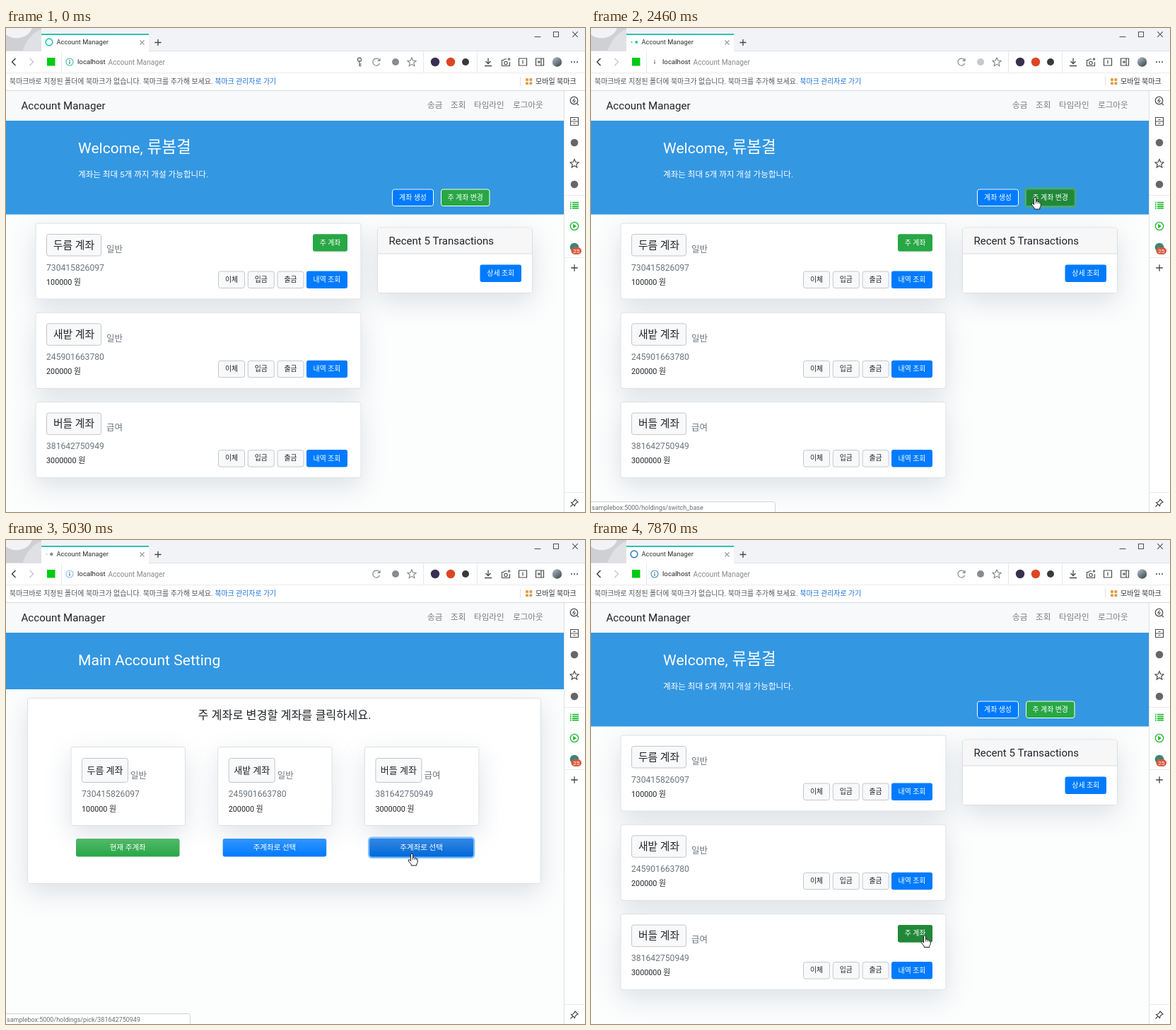
Recreate the animation shown at these times as an HTML page with a canvas. Size 819x684 px, loop 8 s.

```html
<!DOCTYPE html>
<html lang="ko">
<head>
<meta charset="utf-8">
<title>Account Manager</title>
<style>
html, body { margin: 0; width: 100%; height: 100%; overflow: hidden; background: #fcfdfd; }
canvas { display: block; }
</style>
</head>
<body>
<canvas id="stage" width="819" height="684"></canvas>
<script>
const ctx = document.getElementById('stage').getContext('2d');
const LOOP = 8000;
const FONT = 'Roboto, "Noto Sans CJK KR", "Noto Sans KR", sans-serif';
const BLUE = '#007bff', GREEN = '#28a745', GRAY = '#6c757d', INK = '#212529', ICON = '#4a4a4e';
const DARK = { [BLUE]: '#0069d9', [GREEN]: '#218838' };
const SHADOW = 'rgba(125,140,160,.25)';

const accounts = [
  { name: '두름 계좌', kind: '일반', no: '730415826097', sum: '100000 원' },
  { name: '새밭 계좌', kind: '일반', no: '245901663780', sum: '200000 원' },
  { name: '버들 계좌', kind: '급여', no: '381642750949', sum: '3000000 원' }
];

// Bursts of movement: start, end, number of steps
const bursts = [
  [670, 1450, 11], [1530, 1530, 1], [2070, 2770, 10], [3380, 4170, 11], [4630, 5030, 6],
  [5180, 5550, 6], [6560, 7330, 11], [7410, 7410, 1], [7640, 7870, 4]
];

// Pointer track: time, x, y, hand shape
const track = [
  [670, 718, 671, 0], [800, 690, 560, 0], [980, 622, 350, 0], [1130, 590, 244, 1],
  [1290, 614, 241, 1], [1450, 628, 239, 1], [3370, 628, 239, 1], [3380, 617, 248, 0],
  [3540, 604, 300, 0], [3850, 577, 428, 1], [4010, 574, 443, 1], [6500, 574, 443, 1],
  [6560, 566, 453, 0], [6710, 505, 515, 0], [6860, 437, 556, 1], [6940, 428, 567, 0],
  [7020, 438, 567, 1], [7170, 466, 556, 1], [7250, 481, 543, 0], [7330, 485, 541, 0],
  [7410, 484, 540.5, 0], [7630, 484, 540.5, 0], [7640, 482, 545, 1], [7790, 475, 555, 1],
  [7870, 472, 558.5, 1]
];

const HAND = new Path2D('M-1.4 1Q0-.6 1.4 1V6Q3.5 5 4 6.6Q6 5.8 6.3 7.3Q8.2 7 8.2 9V12Q8 14 6.8 15V17H-.8V15.5Q-3.5 12.5-4.8 10Q-5 8.2-3.2 8.8L-1.4 10.6Z');
const HAND_LINES = new Path2D('M1.4 6V9M4 6.8V9.2M6.3 7.4V9.4');
const ARROW = new Path2D('M.5.5V12.8L3.3 10.2 5.2 14.4 7 13.6 5.2 9.5H9.2Z');
const STAR = 'M0-6L1.8-2 6-1.6 2.8 1.3 3.8 5.6 0 3.3-3.8 5.6-2.8 1.3-6-1.6-1.8-2Z';

const fade = (t, a, b) => Math.max(0, Math.min(1, (t - a) / (b - a)));

function snap(t) {
  let out = 0;
  for (const [a, b, n] of bursts) {
    if (t < a) break;
    const step = n > 1 ? (b - a) / (n - 1) : 0;
    const k = step ? Math.min(n - 1, Math.floor((t - a + 10) / step)) : 0;
    out = a + k * step;
  }
  return out;
}

function rect(x, y, w, h, fill) {
  ctx.fillStyle = fill;
  ctx.fillRect(x, y, w, h);
}

function box(x, y, w, h, r, fill, stroke, width = 1) {
  ctx.beginPath();
  ctx.roundRect(x, y, w, h, r);
  if (fill) { ctx.fillStyle = fill; ctx.fill(); }
  if (stroke) { ctx.strokeStyle = stroke; ctx.lineWidth = width; ctx.stroke(); }
}

function dot(x, y, r, fill) {
  ctx.beginPath();
  ctx.arc(x, y, r, 0, 7);
  ctx.fillStyle = fill;
  ctx.fill();
}

function ring(x, y, r, color, width = 1.1) {
  ctx.beginPath();
  ctx.arc(x, y, r, 0, 7);
  ctx.strokeStyle = color;
  ctx.lineWidth = width;
  ctx.stroke();
}

function icon(x, y, d, color = ICON, width = 1.1) {
  ctx.save();
  ctx.translate(x, y);
  ctx.strokeStyle = color;
  ctx.lineWidth = width;
  ctx.stroke(new Path2D(d));
  ctx.restore();
}

// y is the optical middle of the line
function text(s, x, y, size, color = INK, align = 'left') {
  ctx.font = `${size}px ${FONT}`;
  ctx.textAlign = align;
  ctx.fillStyle = color;
  ctx.fillText(s, x, y + size * .36);
}

function card(x, y, w, h) {
  ctx.save();
  ctx.shadowColor = SHADOW;
  ctx.shadowBlur = 36;
  ctx.shadowOffsetY = 12;
  box(x, y, w, h, 3, '#fff');
  ctx.restore();
  box(x + .5, y + .5, w - 1, h - 1, 3, '#fff', '#dcdee0');
}

function button(x, y, w, h, label, color, opt = {}) {
  const { hover = 0, focus = 0, border, size = 9.9, glossy } = opt;
  if (focus) {
    ctx.globalAlpha = focus;
    box(x - 1.2, y - 1.2, w + 2.4, h + 2.4, 4, null, color === BLUE ? '#80bdff' : 'rgba(72,180,97,.6)', 2.4);
    ctx.globalAlpha = 1;
  }
  box(x, y, w, h, 3, color);
  if (hover) {
    ctx.globalAlpha = hover;
    box(x, y, w, h, 3, DARK[color]);
    ctx.globalAlpha = 1;
  }
  if (glossy) {
    const g = ctx.createLinearGradient(0, y, 0, y + h);
    g.addColorStop(0, 'rgba(255,255,255,.2)');
    g.addColorStop(1, 'rgba(255,255,255,0)');
    box(x, y, w, h, 3, g);
  }
  if (border) {
    ctx.globalAlpha = 1 - hover * .75;
    box(x + .5, y + .5, w - 1, h - 1, 3, null, border);
    ctx.globalAlpha = 1;
  }
  text(label, x + w / 2, y + h / 2 - .3, size, '#fff', 'center');
}

function plainButton(x, y, w, h, label, size) {
  box(x + .5, y + .5, w - 1, h - 1, 3, '#f8f9fa', '#c3c6c9');
  text(label, x + w / 2, y + h / 2 - .5, size, INK, 'center');
}

function navbar() {
  rect(0, 89, 789, 595, '#fcfdfd');
  rect(0, 89, 789, 42, '#f8f9fa');
  text('Account Manager', 21.5, 110, 15.1);
  [['송금', 596], ['조회', 629], ['타임라인', 662], ['로그아웃', 717]]
    .forEach(([s, x]) => text(s, x, 109, 11.6, '#7b7c7d'));
}

function homePage(t, main) {
  navbar();
  rect(0, 131, 789, 132.5, '#3397e2');
  text('Welcome,', 102, 169, 21.1, '#fff');
  text('류봄결', 199.5, 168, 22.6, '#fff');
  text('계좌는 최대 5개 까지 개설 가능합니다.', 102, 207, 11.6, '#fff');

  accounts.forEach((a, i) => {
    const y = 275.5 + i * 126.3;
    card(41.5, y, 461, 108);
    plainButton(57, y + 15.5, 78, 31.5, a.name, 14.8);
    text(a.kind, 142, y + 36.5, 12.5, GRAY);
    text(a.no, 57, y + 63, 12.15, GRAY);
    text(a.sum, 57, y + 83.5, 10.8);
    ['이체', '입금', '출금'].forEach((s, k) => plainButton(300 + k * 41.8, y + 68, 38, 24.5, s, 9.9));
    button(425, y + 68, 58, 24.5, '내역 조회', BLUE);
    if (i === main) {
      const crossing = fade(t, 6850, 7000) - fade(t, 7240, 7390);
      const hover = i === 2 ? crossing + fade(t, 7640, 7790) : 0;
      button(434, y + 15.8, 49, 24.5, '주 계좌', GREEN, { hover });
    }
  });

  card(525, 281.5, 220, 93.5);
  rect(526, 282.5, 218, 36.5, '#f7f7f7');
  rect(526, 318.5, 218, 1, '#dcdee0');
  text('Recent 5 Transactions', 541.5, 301, 15);
  button(670.5, 334.5, 58.5, 24.5, '상세 조회', BLUE);

  const first = main === 0;
  button(546, 227.5, 59, 24.5, '계좌 생성', BLUE, {
    border: '#fff',
    hover: first ? fade(t, 1140, 1290) - fade(t, 1300, 1450) : 0
  });
  button(615, 227.5, 69.5, 24.5, '주 계좌 변경', GREEN, {
    border: '#fff',
    hover: first ? fade(t, 1290, 1440) : 0,
    focus: first ? fade(t, 2060, 2210) : 0
  });
}

function settingPage(t) {
  navbar();
  rect(0, 131, 789, 80, '#3397e2');
  text('Main Account Setting', 102, 169, 21.1, '#fff');
  card(30, 223, 727, 263);
  text('주 계좌로 변경할 계좌를 클릭하세요.', 394, 247, 16.3, INK, 'center');
  accounts.forEach((a, i) => {
    const x = 91.5 + i * 207.7;
    card(x, 292, 162.5, 112);
    plainButton(x + 15.5, 308, 66, 35, a.name, 13);
    text(a.kind, x + 84.5, 332.5, 12.5, GRAY);
    text(a.no, x + 15.5, 359, 12.15, GRAY);
    text(a.sum, x + 15.5, 380, 10.8);
    const on = i === 2;
    button(x + 7.5, 422, 146.5, 25.5, i ? '주계좌로 선택' : '현재 주계좌', i ? BLUE : GREEN, {
      size: 10.5,
      glossy: true,
      hover: on ? fade(t, 3840, 3990) : 0,
      focus: on ? fade(t, 4620, 4770) : 0
    });
  });
}

function tabMark(t) {
  const waiting = t >= 4780 && t < 5170 || t >= 2140 && t < 2220;
  const loading = t >= 2220 && t < 2600 || t >= 5170 && t < 5400;
  if (waiting || loading) {
    const color = waiting ? '#8b8f92' : '#25c3a6';
    const swing = waiting ? .8 * Math.sin((t - 4950) / 55) : .5 * Math.sin((t - 2381) / 50);
    dot(57.5, 20, 1.5 - swing, color);
    dot(64.3, 20, 1.5 + swing, color);
  } else {
    ring(61, 20, 4.8, t < 5400 ? '#25c4ad' : '#2f86c6', 1.7);
  }
}

function themeArt() {
  ctx.save();
  ctx.beginPath();
  ctx.rect(0, 0, 50, 33);
  ctx.clip();
  rect(0, 0, 50, 33, '#cfd0d3');
  ctx.fillStyle = '#e0e1e4';
  ctx.beginPath();
  ctx.ellipse(42, 26, 14, 28, .6, 0, 7);
  ctx.fill();
  ctx.fillStyle = '#f3f3f6';
  ctx.beginPath();
  ctx.ellipse(17, 0, 20, 14, -.2, 0, 7);
  ctx.fill();
  ctx.restore();
}

function browserTop(t) {
  rect(0, 0, 819, 33, '#f2f3f6');
  themeArt();
  rect(50, 9, 152, 24, '#fff');
  rect(50, 8, 152, 2, '#2cc5ab');
  tabMark(t);
  text('Account Manager', 71.5, 20, 9.3, '#333');
  icon(192.5, 20.5, 'M-3-3L3 3M3-3L-3 3', '#999');
  icon(215, 20.5, 'M-4.5 0H4.5M0-4.5V4.5', '#444', 1.3);
  icon(752, 12, 'M-4.5.5H4.5', '#555');
  icon(778, 9, 'M-3.5-3.5H3.5V3.5H-3.5Z', '#555');
  icon(805, 9, 'M-3.8-3.8L3.8 3.8M3.8-3.8L-3.8 3.8', '#555');

  rect(0, 33, 819, 56, '#fff');
  rect(0, 32, 50, 1, '#dfe0e3');
  rect(202, 32, 617, 1, '#dfe0e3');
  rect(0, 63, 819, 1, '#e9eaec');
  rect(0, 88, 819, 1, '#d9dadc');
  [78, 590, 666].forEach(x => rect(x, 33, 1, 30, '#e6e7e9'));
  icon(11, 48, 'M2.5-5L-2.5 0 2.5 5', '#333', 1.3);
  icon(36, 48, 'M-2.5-5L2.5 0-2.5 5', '#c4c4c6', 1.3);
  rect(58, 42, 11.5, 11.5, '#05c916');
  ring(90, 48, 5);
  icon(90, 48, 'M0-2.7V-1.4M0-.4V2.8', '#555', 1.2);
  text('localhost', 101, 48, 9.7, '#222');
  text('Account Manager', 144.5, 48, 10.2, '#888');

  if (t < 2220) {
    ring(500, 44.5, 2.6, '#777', 1.5);
    icon(500, 48, 'M0-1V6M0 3H2.5M0 5.5H2.5', '#777', 1.4);
  }
  icon(524, 48, 'M4.6 2A5 5 0 1 1 4.4-2.3M5-5V-1.7H1.6', '#888', 1.2);
  dot(551, 48, 5, t >= 2290 && t < 2600 ? '#c9c9cc' : '#8b8b8f');
  icon(574, 48, STAR, '#808084');
  dot(607, 48, 6.2, '#372f50');
  dot(629, 48, 6.2, '#dc4522');
  dot(650, 48, 5, '#3a3838');
  icon(682, 48, 'M0-5.5V2.5M-3.5-1L0 2.5 3.5-1M-5 5.5H5', ICON, 1.3);
  icon(707, 48, 'M1-4H-2L-3-2.5H-5.5V5.5H5.5V0M2.5-4H6.5M4.5-6V-2');
  ring(707, 49.5, 2.2, ICON);
  icon(731, 48, 'M-5.5-5H5.5V5H-5.5ZM0-2.5V2.5', ICON, 1.2);
  icon(755, 48, 'M-5.5-5H5.5V5H-5.5ZM2-5V5M-3.5 0H1M-1-2V2', ICON, 1.2);
  const g = ctx.createLinearGradient(774, 42, 784, 55);
  g.addColorStop(0, '#a9b7c0');
  g.addColorStop(1, '#3c4a4e');
  dot(779.5, 48, 6.7, g);
  [800, 804, 808].forEach(x => dot(x, 48, 1, '#444'));

  text('북마크바로 지정된 폴더에 북마크가 없습니다. 북마크를 추가해 보세요.', 5, 75, 9.95, '#555');
  text('북마크 관리자로 가기', 295.5, 75, 9.9, '#1a73d9');
  rect(727, 69, 1, 13, '#e2e3e5');
  for (let i = 0; i < 4; i++) box(735 + i % 2 * 5.3, 71 + (i >> 1) * 5.3, 4, 4, 1, '#e0a04c');
  text('모바일 북마크', 749, 75, 10, '#333');
}

function sidebar() {
  rect(789, 89, 30, 595, '#fff');
  rect(789, 89, 1, 595, '#dedfe1');
  [236, 324, 656].forEach(y => rect(790, y, 29, 1, '#ececee'));
  ring(803.5, 102.5, 5.3, ICON, 1.2);
  icon(804, 103, 'M3.5 3.5L6 6M.5-3.5L-2 0H1L-1 3', ICON, 1.1);
  icon(804, 132, 'M-5.5-5.5H5.5V5.5H-5.5ZM-5.5 0H5.5M-1.5-2.5H1.5M-1.5 2.8H1.5');
  dot(804, 162, 5.3, '#66666a');
  icon(804, 191.5, STAR, ICON, 1.2);
  dot(804, 221, 5.3, '#66666a');
  icon(804, 250.5, 'M-3-4H6M-3-1.3H6M-3 1.4H6M-3 4.1H6M-6-4H-4.2M-6-1.3H-4.2M-6 1.4H-4.2M-6 4.1H-4.2', '#18b82a', 1.6);
  ring(804, 280, 5.6, '#18b82a', 1.3);
  ctx.fillStyle = '#18b82a';
  ctx.fill(new Path2D('M802.2 277L807 280 802.2 283Z'));
  dot(804, 310, 6.3, '#3f8473');
  box(799.5, 310, 14.5, 10, 5, '#d9573f');
  text('25', 806.8, 315, 8, '#fff', 'center');
  icon(804, 339, 'M-4.8 0H4.8M0-4.8V4.8', '#444', 1.3);
  icon(804, 671, 'M1-5L5-1 3.5-.5 1 2 .5 4.5-4.5-.5-2-1 .5-3.5ZM-2 2L-5.5 5.5', ICON, 1.2);
}

function status(label, alpha) {
  if (alpha <= 0) return;
  ctx.globalAlpha = alpha;
  box(-1, 669.5, 261.5, 16, [0, 3, 0, 0], '#fff', '#d0d1d3');
  text(label, 1, 677.5, 9, '#6b6c6e');
  ctx.globalAlpha = 1;
}

function pointer(t) {
  if (t < track[0][0]) return;
  let i = 0;
  while (i < track.length - 1 && track[i + 1][0] <= t) i++;
  const a = track[i], b = track[i + 1] || a;
  const k = a === b ? 0 : fade(t, a[0], b[0]);
  ctx.save();
  ctx.translate(a[1] + (b[1] - a[1]) * k, a[2] + (b[2] - a[2]) * k);
  const hand = a[3];
  ctx.fillStyle = '#fff';
  ctx.strokeStyle = '#1c1c1c';
  ctx.lineJoin = 'round';
  ctx.lineWidth = 1;
  ctx.fill(hand ? HAND : ARROW);
  ctx.stroke(hand ? HAND : ARROW);
  if (hand) {
    ctx.lineWidth = .8;
    ctx.stroke(HAND_LINES);
  }
  ctx.restore();
}

function draw(time) {
  const t = snap(time);
  ctx.clearRect(0, 0, 819, 684);
  if (t < 2530) homePage(t, 0);
  else if (t < 5320) settingPage(t);
  else homePage(t, 2);
  browserTop(t);
  sidebar();
  status('samplebox:5000/holdings/switch_base', fade(t, 1380, 1530) - fade(t, 2530, 2690));
  status('samplebox:5000/holdings/pick/381642750949', fade(t, 4010, 4160) - fade(t, 5320, 5470));
  pointer(t);
}

const start = performance.now();
function tick() {
  draw((performance.now() - start) % LOOP);
  requestAnimationFrame(tick);
}
tick();
</script>
</body>
</html>
```
